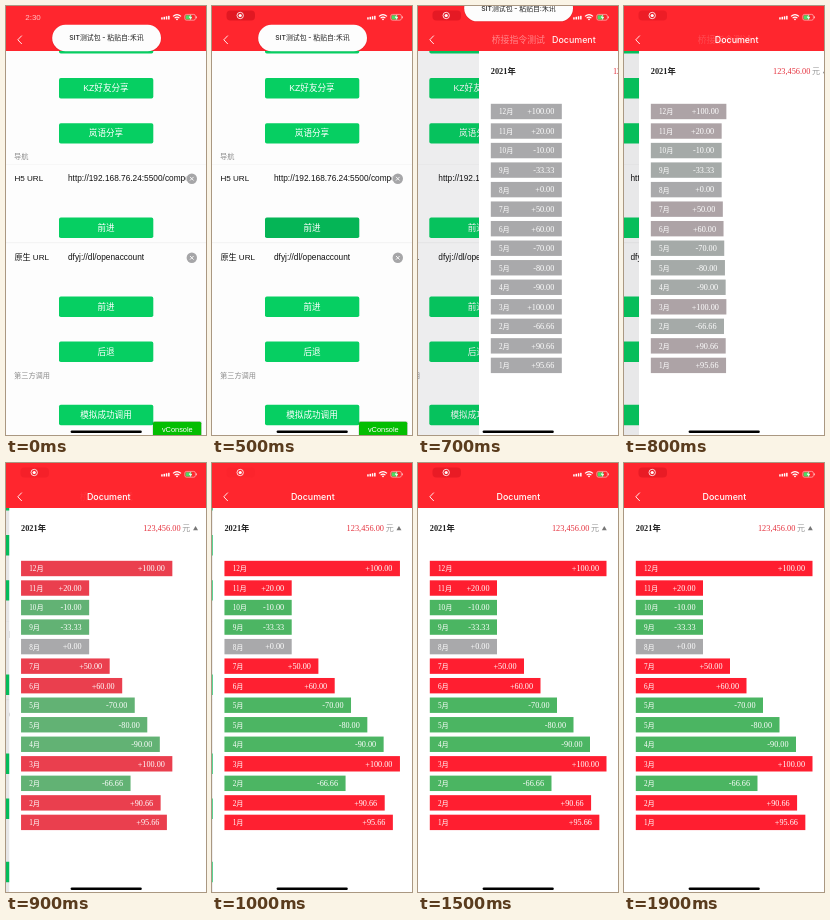
Recreate the animation shown at these times as an HTML page. Size 200 by 429 pixels, loop 2 s.

```html
<!DOCTYPE html>
<html lang="zh-CN">
<head>
<meta charset="utf-8">
<title>Document</title>
<style>
html, body { margin: 0; width: 100%; height: 100%; overflow: hidden; background: #fff; }
svg { display: block; width: 100vw; height: 100vh; }
text { font-family: "Liberation Sans", "Noto Sans CJK SC", "Noto Sans CJK", sans-serif; }
.serif, .serif text { font-family: "Liberation Serif", "Noto Sans CJK SC", "Noto Sans CJK", serif; }
.title { font-family: Inter, "Noto Sans CJK SC", "Noto Sans CJK", sans-serif; font-weight: 500; }
</style>
</head>
<body>
<svg id="stage" viewBox="0 0 200 429" xmlns="http://www.w3.org/2000/svg"></svg>
<script>
const stage = document.getElementById('stage');
const LOOP = 2000, STEP = 100;
const RED = [255, 30, 48], GREEN = [75, 181, 98], GRAY = [169, 169, 171];

function add(parent, tag, attrs = {}, text) {
  const el = document.createElementNS('http://www.w3.org/2000/svg', tag);
  set(el, attrs);
  if (text !== undefined) el.textContent = text;
  parent.appendChild(el);
  return el;
}
function set(el, attrs) {
  for (const k in attrs) el.setAttribute(k, attrs[k]);
}
const rect = (p, x, y, width, height, fill, more) =>
  add(p, 'rect', { x, y, width, height, fill, ...more });
// cy is the optical middle of the line
const label = (p, s, x, cy, size, fill, more) =>
  add(p, 'text', { x, y: cy + size * 0.36, 'font-size': size, fill, ...more }, s);
const mid = { 'text-anchor': 'middle' };
const end = { 'text-anchor': 'end' };

// First page
const home = add(stage, 'g');
rect(home, 0, 0, 200, 429, '#fdfdfd');
rect(home, 0, 158, 200, 0.4, '#ececec');
rect(home, 0, 236.6, 200, 0.5, '#e6e6e6');

function button(s, cy) {
  const box = rect(home, 53, cy - 10.2, 94.3, 20.4, '#06cf62', { rx: 1.8 });
  label(home, s, 100, cy, 8.6, '#fff', { ...mid, 'font-weight': 500 });
  return box;
}
button('', 37.3);
button('KZ好友分享', 82.3);
button('岚语分享', 127.4);
const tapped = button('前进', 221.8);
button('前进', 300.8);
button('后退', 345.8);
button('模拟成功调用', 409);

label(home, '导航', 8, 150.3, 7.2, '#8c8c8c');
label(home, '第三方调用', 8, 369, 7.2, '#8c8c8c');

function field(name, value, cy) {
  label(home, name, 8.4, cy, 8.1, '#111');
  const box = add(home, 'svg', { x: 62, y: cy - 8, width: 118.2, height: 16 });
  label(box, value, 0, 8, 8.3, '#111');
  add(home, 'circle', { cx: 185.8, cy: cy + 0.3, r: 5.2, fill: '#a6a6a8' });
  add(home, 'path', {
    d: `M184 ${cy - 1.5}l3.6 3.6m0 -3.6l-3.6 3.6`, stroke: '#fff', 'stroke-width': 0.9
  });
}
field('H5 URL', 'http://192.168.76.24:5500/component', 172.4);
field('原生 URL', 'dfyj://dl/openaccount', 251.5);

rect(home, 146.4, 415, 49.6, 16, '#000', { opacity: 0.15, rx: 2 });
rect(home, 147, 415.8, 48.2, 14, '#04be02', { rx: 1.5 });
label(home, 'vConsole', 171.3, 423, 7.4, '#fff', mid);

const shade = rect(stage, 0, 45, 200, 384, '#000010');

// Second page
const page = add(stage, 'g', { class: 'serif' });
rect(page, 0, 45, 200, 384, '#fff');
label(page, '2021年', 11.8, 65, 8.3, '#222', { 'font-weight': 700 });
label(page, '123,456.00', 171.3, 65, 8.3, '#e5323e', end);
label(page, '元', 173, 65, 8, '#999');
add(page, 'path', { d: 'M183.8 67.3h5l-2.5 -4.3z', fill: '#777' });

const months = [12, 11, 10, 9, 8, 7, 6, 5, 5, 4, 3, 2, 2, 1];
const sums = [100, 20, -10, -33.33, 0, 50, 60, -70, -80, -90, 100, -66.66, 90.66, 95.66];
const bars = sums.map((v, i) => {
  const y = 97.8 + i * 19.53;
  const box = rect(page, 11.8, y, 71, 15.4);
  label(page, months[i] + '月', 20, y + 8, 7.2, '#fff');
  const sum = label(page, (v < 0 ? '' : '+') + v.toFixed(2), 0, y + 7.6, 8.2, '#fff', end);
  const color = v > 0 ? RED : v < 0 ? GREEN : GRAY;
  return { box, sum, color, full: Math.max(67.2, 11.7 + 1.65 * Math.abs(v)) };
});

// Navigation and status bar
rect(stage, 0, 0, 200, 45, '#ff262e');
add(stage, 'path', {
  d: 'M15.8 29.6l-4 4.2l4 4.2', fill: 'none', stroke: '#fff', 'stroke-width': 0.9
});
const oldTitle = label(stage, '桥接指令测试', 100.3, 33.8, 8.9, '#fff', { ...mid, class: 'title' });
const newTitle = label(stage, 'Document', 0, 33.8, 8.9, '#fff', { ...mid, class: 'title' });

const clock = label(stage, '2:30', 27, 11.4, 8, '#fff', mid);
const rec = add(stage, 'g');
const pill = rect(rec, 14.5, 4.6, 28.5, 10, '#d9141f', { rx: 4 });
add(rec, 'circle', { cx: 28.2, cy: 9.5, r: 3.2, fill: 'none', stroke: '#fff', 'stroke-width': 0.8 });
add(rec, 'circle', { cx: 28.2, cy: 9.5, r: 1.6, fill: '#fff' });

for (let i = 0; i < 4; i++) {
  rect(stage, 155.2 + i * 2.3, 11.2 - i * 0.5, 1.5, 2.4 + i * 0.5, '#fff', { rx: 0.4 });
}
const arcs = { fill: 'none', stroke: '#fff', 'stroke-width': 1.2 };
add(stage, 'path', { d: 'M167 10.4q4 -3.6 8 0M168.6 12.1q2.4 -2.1 4.8 0', ...arcs });
add(stage, 'circle', { cx: 171, cy: 13.3, r: 0.9, fill: '#fff' });
rect(stage, 178.8, 8.4, 10.6, 5.8, 'none', { rx: 1.7, stroke: '#ffd0d0', 'stroke-width': 0.6 });
rect(stage, 179.6, 9.2, 6, 4.2, '#4cd964', { rx: 0.9 });
add(stage, 'path', { d: 'M184.8 8.2l-2 3.5h1.6l-0.7 2.7l2.4 -3.5h-1.7z', fill: '#fff' });
rect(stage, 190, 10.2, 0.8, 2.2, '#ffd0d0', { rx: 0.4 });

const toast = add(stage, 'g');
rect(toast, 45.6, 19, 110, 27, '#000', { rx: 13.4, opacity: 0.07 });
rect(toast, 46.2, 18.8, 108.8, 26.4, '#fdfdfd', { rx: 13.2 });
label(toast, 'SIT测试包 - 粘贴自:禾讯', 100.4, 32, 6.85, '#222',
  { ...mid, class: 'title' });

rect(stage, 64.6, 424.6, 71.2, 2.5, '#000', { rx: 1.25 });

const clamp = x => Math.min(1, Math.max(0, x));

// The standard CSS "ease" curve
function ease(x) {
  const curve = (a, b, s) => 3 * a * s * (1 - s) ** 2 + 3 * b * s * s * (1 - s) + s ** 3;
  let lo = 0, hi = 1;
  for (let i = 0; i < 24; i++) {
    const m = (lo + hi) / 2;
    if (curve(0.25, 0.25, m) < x) lo = m; else hi = m;
  }
  return curve(0.1, 1, lo);
}

function draw(t) {
  // Page push: critically damped spring, rest runs from 1 to 0
  const s = Math.max(0, t - 568) * 0.0183;
  const rest = (1 + s) * Math.exp(-s);
  const done = 1 - rest;
  set(home, { transform: `translate(${-60 * done} 0)` });
  set(page, { transform: `translate(${200 * rest} 0)` });
  set(shade, { opacity: 0.09 * done });
  set(oldTitle, { opacity: done > 0.99 ? 0 : rest ** 0.7 });
  set(newTitle, { x: 100.4 + 200 * rest ** 1.08, opacity: clamp(done * 1.35) });

  set(tapped, { fill: t >= 400 && t <= 600 ? '#05b556' : '#06cf62' });
  set(toast, { transform: `translate(0 ${-56 * clamp((t - 540) / 300) ** 1 })` });

  const swap = clamp((t - 100) / 200);
  set(clock, { opacity: 0.7 * (1 - swap) });
  set(rec, { opacity: swap });
  set(pill, { opacity: 0.4 + 0.4 * Math.cos((t - 550) / 1150 * 2 * Math.PI) });

  const grow = ease(clamp((t - 785) / 250));
  for (const b of bars) {
    const w = 71 + (b.full - 71) * grow;
    const rgb = GRAY.map((c, i) => Math.round(c + (b.color[i] - c) * grow));
    set(b.box, { width: w, fill: `rgb(${rgb})` });
    set(b.sum, { x: 11.8 + w - 7.5 });
  }
}

const start = performance.now();
function tick() {
  const t = Math.floor((performance.now() - start) % LOOP / STEP) * STEP;
  draw(t < 200 ? 0 : t);
  requestAnimationFrame(tick);
}
tick();
</script>
</body>
</html>
```
